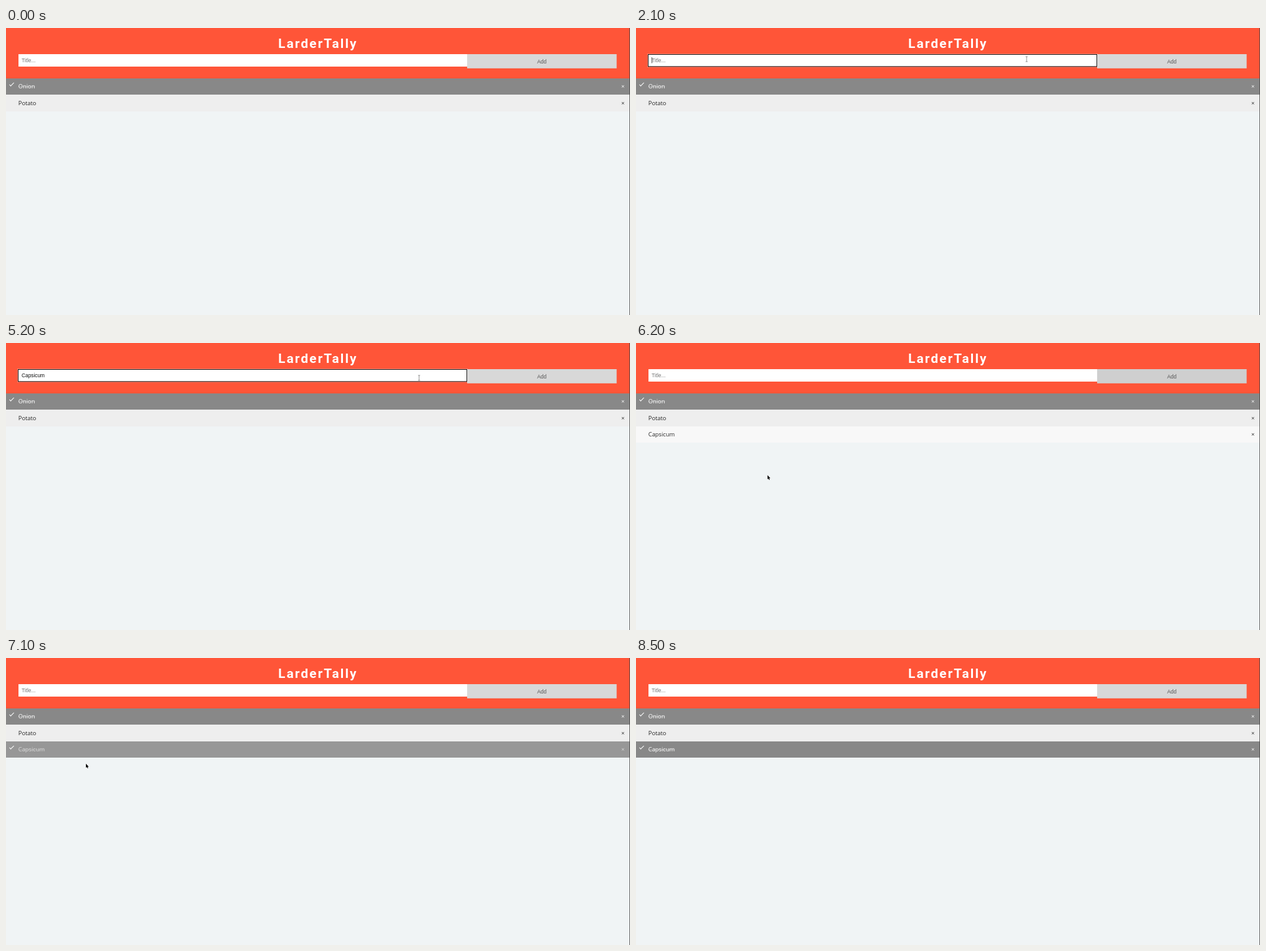
Animation, 1000 px wide and 461 px high, one loop 9700 ms. Source, as an HTML page with a canvas:

```html
<!DOCTYPE html>
<html lang="en">
<head>
<meta charset="utf-8">
<title>LarderTally</title>
<style>
  html, body { margin: 0; width: 100%; height: 100%; overflow: hidden; background: #f0f4f5; }
  canvas { display: block; }
</style>
</head>
<body>
<canvas id="stage" width="1000" height="461"></canvas>
<script>
const ctx = document.getElementById('stage').getContext('2d');
const LOOP = 9700, TICK = 100, BLINK = 600;
const UI = '8.33px "Liberation Sans", Arial, sans-serif';
const LIST = '9.3px "Open Sans", sans-serif';

const FOCUS = 900, ADDED = 5800, CHECKED = 7000;
const TYPING = 3100, KEY_GAP = 214, TYPING_SEEN = 5200;
const WORD = 'Capsicum';
const LIST_TOP = 80.8, ROW = 26.55;

// Pointer strokes: a curve between two places, slowing down by the power `ease`.
const moves = [
  { start: 200, end: 600, ease: 2, from: { x: 720, y: 0 }, to: { x: 626, y: 50 } },
  { start: 5200, end: 5600, ease: 1, from: { x: 662, y: 56 }, to: { x: 812, y: 54 } },
  { start: 6000, end: 6700, ease: 3, from: { x: 812, y: 54 }, via: { x: 121, y: 313 }, to: { x: 116, y: 149 } },
  { start: 7000, end: 7400, ease: 1, from: { x: 116, y: 149 }, via: { x: 140, y: 188 }, to: { x: 165, y: 247 } },
  { start: 8000, end: 8500, ease: 1, from: { x: 165, y: 247 }, to: { x: 300, y: 470 } }
];

const ramp = (t, from, to) => Math.min(1, Math.max(0, (t - from) / (to - from)));
const mix = (a, b, p) => a + (b - a) * p;
const gray = v => `rgb(${[v, v, v].map(Math.round)})`;

function rect(x, y, w, h, color) {
  ctx.fillStyle = color;
  ctx.fillRect(x, y, w, h);
}

function text(str, x, y, font, color, align = 'left') {
  ctx.font = font;
  ctx.fillStyle = color;
  ctx.textAlign = align;
  ctx.fillText(str, x, y);
}

function frame(x, y, w, h, color, width) {
  ctx.strokeStyle = color;
  ctx.lineWidth = width;
  ctx.strokeRect(x, y, w, h);
}

function drawHeader(t) {
  rect(0, 0, 1000, 81, '#ff5538');
  ctx.letterSpacing = '2.1px';
  text('LarderTally', 500, 32, 'bold 20.8px Roboto, sans-serif', '#fff', 'center');
  ctx.letterSpacing = '0px';

  const hover = Math.min(ramp(t, 5350, 5550), 1 - ramp(t, 6060, 6260));
  rect(739, 42, 239.6, 22.8, gray(mix(0xd8, 0xbb, hover)));
  text('Add', 858.7, 57, UI, '#555', 'center');
}

function caretVisible(t, keys) {
  const last = keys ? TYPING + (keys - 1) * KEY_GAP : FOCUS;
  return Math.floor((t - last) / BLINK) % 2 === 0;
}

function drawInput(t) {
  rect(20, 42, 719, 20, '#fff');
  const keys = t < TYPING || t >= ADDED ? 0
    : Math.min(WORD.length, Math.floor((t - TYPING) / KEY_GAP) + 1);
  const typed = WORD.slice(0, keys);
  text(typed || 'Title...', 25, 54.7, UI, typed ? '#111' : '#777');
  if (t < FOCUS || t >= ADDED) return;

  frame(18.7, 41.5, 720.6, 21.5, 'rgba(255,255,255,.5)', 0.6);
  frame(19.5, 42.5, 719, 19.4, '#111', 1);
  if (caretVisible(t, keys)) rect(25 + ctx.measureText(typed).width, 47, 0.8, 9.5, '#222');
}

function drawItem(label, index, back, ink, done) {
  const y = LIST_TOP + index * ROW, base = y + 16.2;
  const top = Math.round(y), color = gray(ink);
  rect(0, top, 1000, Math.round(y + ROW) - top, gray(back));
  text(label, 19.8, base, LIST, color);
  text('×', 988.7, base, LIST, color, 'center');
  if (!done) return;

  ctx.globalAlpha = 0.55;
  ctx.textAlign = 'left';
  rect(19.8, base - 3.2, ctx.measureText(label).width, 0.6, color);
  ctx.globalAlpha = 1;

  // Tick mark: two sides of a box turned by 45 degrees
  ctx.save();
  ctx.translate(7.6, y + 12.9);
  ctx.rotate(Math.PI / 4);
  rect(-3.5, -1, 3.5, 1, '#fff');
  rect(-1, -7.6, 1, 7.6, '#fff');
  ctx.restore();
}

function drawList(t) {
  drawItem('Onion', 0, 0x88, 255, true);
  drawItem('Potato', 1, 0xee, 40, false);
  if (t < ADDED) return;
  const idle = mix(0xf8, 0xdd, ramp(t, 6450, 6600));
  const done = ramp(t, 6935, 7135);
  drawItem(WORD, 2, mix(idle, 0x88, done), mix(40, 255, done), t >= CHECKED);
}

function pointerAt(t) {
  const { start, end, ease, from, to, via } = moves.filter(m => m.start <= t).pop();
  const p = 1 - (1 - ramp(t, start, end)) ** ease;
  const along = axis => {
    const bend = via ? via[axis] : mix(from[axis], to[axis], 0.5);
    return mix(mix(from[axis], bend, p), mix(bend, to[axis], p), p);
  };
  return [along('x'), along('y')];
}

function drawArrow() {
  const head = new Path2D('M0 0V6.6L1.5 5.3L2.5 7.6L3.6 7.1L2.6 4.9H4.6Z');
  ctx.strokeStyle = '#fff';
  ctx.lineWidth = 1;
  ctx.stroke(head);
  ctx.fillStyle = '#000';
  ctx.fill(head);
}

function drawHand() {
  const hand = new Path2D('M-.7 0H.7L.9 3L4 3.8V6L3 8.5H-.8L-3 5L-.8 5.5Z');
  ctx.fillStyle = '#fff';
  ctx.fill(hand);
  ctx.strokeStyle = '#000';
  ctx.lineWidth = 0.8;
  ctx.stroke(hand);
}

function drawBeam() {
  ctx.strokeStyle = '#777';
  ctx.lineWidth = 0.8;
  ctx.stroke(new Path2D('M0 -4V4M-1.6 -4H1.6M-1.6 4H1.6'));
}

function drawPointer(t) {
  if (t < 300 || (t >= TYPING && t < TYPING_SEEN)) return;
  const [x, y] = pointerAt(t);
  const inField = y >= 42 && y < 65;
  const listEnd = LIST_TOP + ROW * (t < ADDED ? 2 : 3);
  const onItem = y >= LIST_TOP && y < listEnd;
  ctx.save();
  ctx.translate(x, y);
  if (inField && x < 739) drawBeam();
  else if (inField || onItem) drawHand();
  else drawArrow();
  ctx.restore();
}

function draw(now) {
  const t = Math.floor((now % LOOP) / TICK) * TICK;
  rect(0, 0, 1000, 461, '#f0f4f5');
  drawHeader(t);
  drawInput(t);
  drawList(t);
  rect(999.2, 0, 0.8, 461, '#444');
  drawPointer(t);
}

const start = performance.now();
function loop() {
  draw(performance.now() - start);
  requestAnimationFrame(loop);
}
loop();
</script>
</body>
</html>
```
